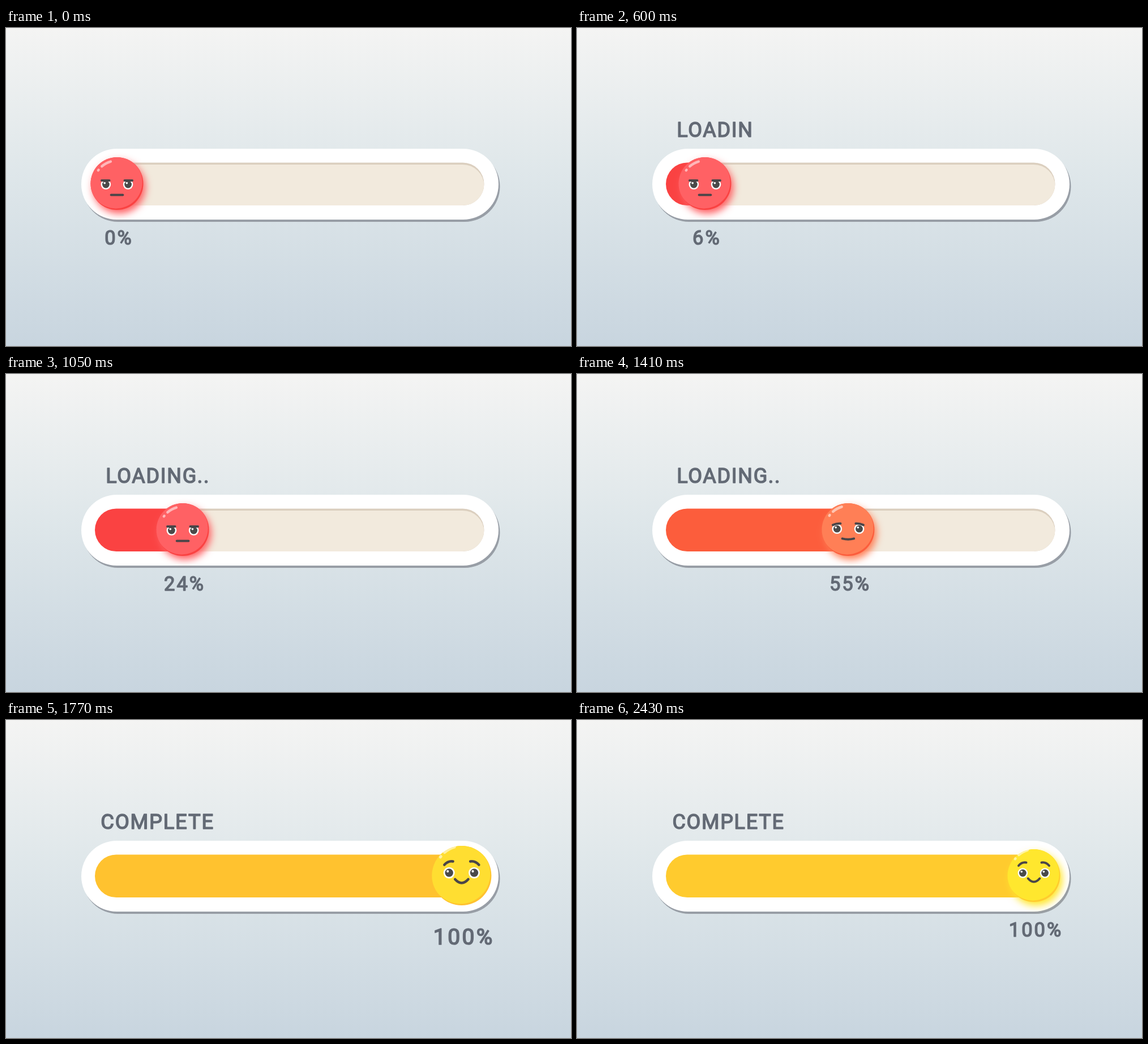
Recreate the animation shown at these times as an HTML page with a canvas. Size 998 px wide and 561 px high, loop 4470 ms.

```html
<!DOCTYPE html>
<html lang="en">
<head>
<meta charset="utf-8">
<title>Loading bar</title>
<style>
  html, body { margin: 0; width: 100%; height: 100%; overflow: hidden; }
  canvas { display: block; }
</style>
</head>
<body>
<canvas width="998" height="561"></canvas>
<script>
const ctx = document.querySelector('canvas').getContext('2d');
const LOOP = 4470, STEP = 30, TRAVEL = 1800;
const START_X = 196, END_X = 807, MID_Y = 274.5, R = 46.5;
const INK = '#636a75', DARK = '#4a4548';

const progress = (t, from, to) => Math.min(1, Math.max(0, (t - from) / (to - from)));
const bump = (t, from, to) => Math.sin(Math.PI * progress(t, from, to));

// cubic-bezier(x1, 0, x2, 1)
function ease(u, x1, x2) {
  let lo = 0, hi = 1, s;
  for (let i = 0; i < 24; i++) {
    s = (lo + hi) / 2;
    const x = 3 * s * (1 - s) * ((1 - s) * x1 + s * x2) + s ** 3;
    if (x < u) lo = s; else hi = s;
  }
  return s * s * (3 - 2 * s);
}

function pill(x, y, w, h, color) {
  ctx.fillStyle = color;
  ctx.beginPath();
  ctx.roundRect(x, y, w, h, h / 2);
  ctx.fill();
}

function disc(x, y, r, color) {
  ctx.fillStyle = color;
  ctx.beginPath();
  ctx.arc(x, y, r, 0, 7);
  ctx.fill();
}

function curve(x0, y0, cx, cy, x1, y1) {
  ctx.strokeStyle = DARK;
  ctx.lineWidth = 4;
  ctx.beginPath();
  ctx.moveTo(x0, y0);
  ctx.quadraticCurveTo(cx, cy, x1, y1);
  ctx.stroke();
}

// A thin outline rounds the letter corners
function label(text, x, y, size, spacing, align) {
  ctx.font = `${size}px Roboto, sans-serif`;
  ctx.letterSpacing = spacing + 'px';
  ctx.textAlign = align;
  ctx.fillStyle = ctx.strokeStyle = INK;
  ctx.lineWidth = 1.5;
  ctx.fillText(text, x, y);
  ctx.strokeText(text, x, y);
}

function drawBar(x, fill) {
  const sky = ctx.createLinearGradient(0, 0, 0, 561);
  sky.addColorStop(0, '#f4f4f3');
  sky.addColorStop(0.45, '#dfe7ea');
  sky.addColorStop(1, '#c8d5df');
  ctx.fillStyle = sky;
  ctx.fillRect(0, 0, 998, 561);

  pill(135.5, 217, 737, 125, '#989ea6');
  pill(133, 213, 737, 125, '#fff');
  ctx.save();
  ctx.beginPath();
  ctx.roundRect(157, 237.5, 687.5, 75.5, 37.75);
  ctx.clip();
  ctx.fillStyle = '#dbcfbf';
  ctx.fillRect(x, 237, 845 - x, 77);
  pill(x - 38, 241, 882.5 - x, 75.5, '#f2eadd');
  ctx.fillStyle = fill;
  ctx.fillRect(157, 237, x - 157, 77);
  ctx.restore();
}

function drawTitle(t, done) {
  if (!done) {
    label('LOADING..'.slice(0, Math.ceil(t / 113)), 176.2, 192.2, 36, 1.7, 'left');
    return;
  }
  const s = 1 + 0.23 * bump(t, 1740, 2130) ** 2;
  ctx.save();
  ctx.translate(266.5, 179.5);
  ctx.scale(s, s);
  label('COMPLETE', 1, 12.7, 36, 1.7, 'center');
  ctx.restore();
}

function drawBall(color, rim, scale) {
  // The glow fades while the ball is enlarged
  const glow = Math.max(0, 1 - 8 * (scale - 1));
  ctx.save();
  ctx.shadowColor = color;
  ctx.shadowBlur = 13 * glow;
  ctx.shadowOffsetX = 4 * glow;
  ctx.shadowOffsetY = 6.5 * glow;
  disc(0, 0, R, rim);
  ctx.restore();

  ctx.save();
  ctx.beginPath();
  ctx.arc(0, 0, R, 0, 7);
  ctx.clip();
  disc(-1.8, -2.6, R, color);
  ctx.restore();
}

// mood runs from 0 (grumpy) to 1 (happy)
function drawFace(mood) {
  const bend = mood * mood;
  ctx.strokeStyle = 'rgba(255,255,255,.55)';
  ctx.lineWidth = 4.5;
  for (const [from, to] of [[-2.29, -1.85], [-2.53, -2.5]]) {
    ctx.beginPath();
    ctx.arc(0, -6 * bend, 40.5, from, to);
    ctx.stroke();
  }

  const brow = -5.5 - 5 * mood, arch = brow - 14 * bend;
  const eyeY = 1.5 - 6 * mood;
  ctx.save();
  ctx.beginPath();
  ctx.rect(-R, arch, 2 * R, R);
  ctx.clip();
  for (const x of [-19.6, 19.6]) {
    disc(x, eyeY, 8.8, '#fff');
    disc(x, eyeY, 6.4, '#4a4a4a');
    disc(x - 2.2, eyeY - 2.4, 1.8, '#fff');
  }
  ctx.restore();

  for (const side of [-1, 1])
    curve(side * 27, -5.5 - 12 * bend, side * 21, arch, side * 13.5, brow - 12.5 * bend);
  const mouth = 20 - 3 * mood;
  curve(-10.3, mouth - 12 * bend, 0, mouth, 10.3, mouth - 12 * bend);
}

function draw(t) {
  const moved = ease(progress(t, 0, TRAVEL), 0.97, 0.83);
  const x = START_X + (END_X - START_X) * moved;
  const count = Math.min(100, Math.floor(100.5 * moved * (1.37 - 0.37 * moved)));
  const scale = 1 + 0.25 * bump(t, 1630, 2430);
  const mood = progress(t, 1070, 1790), warm = mood * mood;
  const fill = `hsl(${45 * warm} ${95 + 5 * mood}% ${62 - 3 * warm}%)`;
  const skin = `hsl(${359 + 14 * mood + 40 * warm} 100% ${69 - 10 * warm}%)`;

  ctx.lineCap = ctx.lineJoin = 'round';
  drawBar(x, fill);
  drawTitle(t, count === 100);

  ctx.save();
  ctx.translate(x, MID_Y);
  ctx.scale(scale, scale);
  drawBall(skin, fill, scale);
  drawFace(mood);
  label(count + '%', 3.5, 107.5, 34.5, 3, 'center');
  ctx.restore();
}

const start = performance.now();
function frame() {
  const t = (performance.now() - start) % LOOP;
  draw(Math.floor(t / STEP) * STEP);
  requestAnimationFrame(frame);
}
frame();
</script>
</body>
</html>
```
